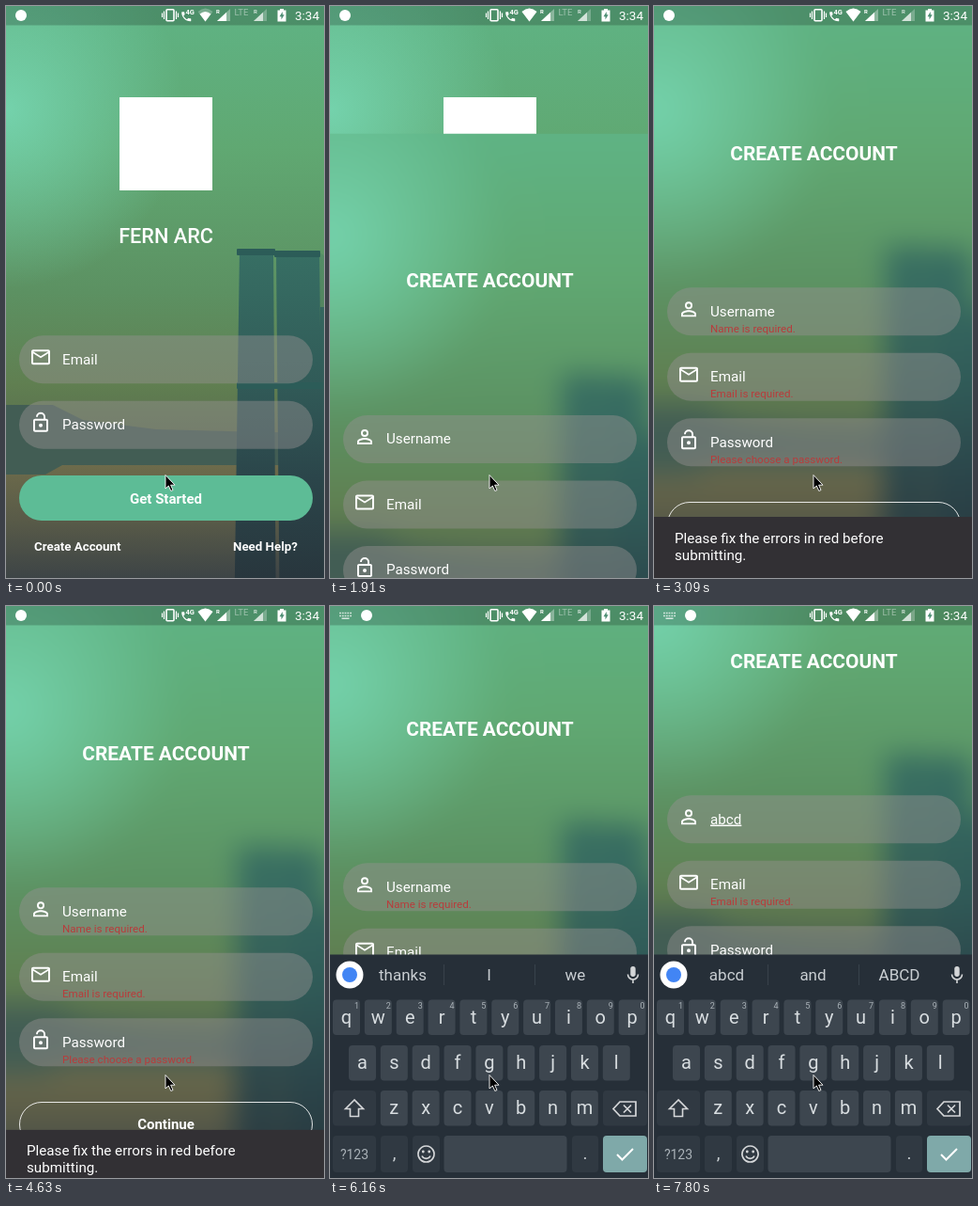
Animation, 339 px wide and 608 px high, one loop 8000 ms. Source, as an HTML page:

```html
<!DOCTYPE html>
<html lang="en">
<head>
<meta charset="utf-8">
<title>Create account</title>
<style>
  html, body { margin: 0; width: 100%; height: 100%; overflow: hidden; background: #5c9163; }
  svg { display: block; }
  text { font-family: Roboto, "Noto Sans", sans-serif; white-space: pre; }
  .mid { text-anchor: middle; }
  .b { font-weight: 700; }
</style>
</head>
<body>
<svg id="stage" width="339" height="608" viewBox="0 0 339 608" fill="#fff"></svg>
<script>
const ICONS = {
  mail: 'M20 4H4c-1.1 0-2 .9-2 2v12c0 1.1.9 2 2 2h16c1.1 0 2-.9 2-2V6c0-1.1-.9-2-2-2zm0 14H4V8l8 5 8-5v10zm-8-7L4 6h16l-8 5z',
  person: 'M12 5.9a2.1 2.1 0 1 1 0 4.2a2.1 2.1 0 0 1 0-4.2m0 9c2.97 0 6.1 1.46 6.1 2.1v1.1H5.9V17c0-.64 3.13-2.1 6.1-2.1M12 4a4 4 0 1 0 0 8a4 4 0 0 0 0-8zm0 9c-2.67 0-8 1.34-8 4v3h16v-3c0-2.66-5.33-4-8-4z',
  lock: 'M12 17a2 2 0 1 0 0-4a2 2 0 0 0 0 4zm6-9h-1V6A5 5 0 0 0 7 6h1.9a3.1 3.1 0 0 1 6.2 0v2H6c-1.1 0-2 .9-2 2v10c0 1.1.9 2 2 2h12c1.1 0 2-.9 2-2V10c0-1.1-.9-2-2-2zm0 12H6V10h12v10z',
  phone: 'M6.6 10.8c1.4 2.8 3.8 5.1 6.6 6.6l2.2-2.2c.3-.3.7-.4 1-.2 1.1.4 2.3.6 3.6.6.6 0 1 .4 1 1V20c0 .6-.4 1-1 1C10.600 21 3 13.400 3 4c0-.6.4-1 1-1h3.500c.6 0 1 .4 1 1 0 1.300.2 2.500.6 3.600.1.3 0 .7-.2 1z'
};

const text = (x, y, size, str, attrs = '') => `<text x="${x}" y="${y}" font-size="${size}" ${attrs}>${str}</text>`;
const rect = (x, y, w, h, r, attrs = '') => `<rect x="${x}" y="${y}" width="${w}" height="${h}" rx="${r}" ${attrs}/>`;
const line = (d, width, attrs = '') => `<path d="${d}" fill="none" stroke="#fff" stroke-width="${width}" ${attrs}/>`;
const icon = (name, x, y, scale = 1) => `<path transform="translate(${x} ${y}) scale(${scale})" d="${ICONS[name]}"/>`;
const gradient = (id, y1, y2, stops) =>
  `<linearGradient id="${id}" gradientUnits="userSpaceOnUse" x1="0" x2="0" y1="${y1}" y2="${y2}">` +
  stops.map(([at, color]) => `<stop offset="${at}" stop-color="${color}"/>`).join('') + '</linearGradient>';

const field = (y, name, label, id = '') =>
  rect(14, y, 313, 51, 25.5, 'fill="#969191" fill-opacity=".45"') + icon(name, 25, y + 11) +
  text(60, y + 30.3, 15.2, label, id && `id="${id}"`);
const error = (y, str, id) => text(60, y + 47.5, 11.6, str, `id="${id}" fill="#b83c3c"`);

function scenery() {
  const slab = (x, y, w) => rect(x, y, w, 7, 1, 'fill="#2c5c58"');
  return `<defs>
    ${gradient('sky', 0, 608, [[0, '#5fb384'], [.25, '#60a872'], [.5, '#5c9162'], [.66, '#607f51'], [.8, '#56634c'], [1, '#3c474a']])}
    ${gradient('water', 488, 608, [[0, '#6d6b4b'], [.5, '#585a48'], [1, '#3d4446']])}
    ${gradient('tower', 258, 608, [[0, '#376f64'], [.4, '#315b58'], [.7, '#2b454a'], [1, '#28363d']])}
    <radialGradient id="glow" gradientUnits="userSpaceOnUse" cx="0" cy="110" r="190">
      <stop offset="0" stop-color="#74d2ac"/><stop offset="1" stop-color="#74d2ac" stop-opacity="0"/>
    </radialGradient>
    <filter id="blur" filterUnits="userSpaceOnUse" x="-60" y="-60" width="459" height="728" color-interpolation-filters="sRGB">
      <feGaussianBlur stdDeviation="15"/>
    </filter>
    <g id="scene">
      ${rect(-60, -60, 459, 728, 0, 'fill="url(#sky)"')}
      ${rect(-60, -60, 459, 400, 0, 'fill="url(#glow)"')}
      ${rect(-60, 488, 459, 180, 0, 'fill="url(#water)"')}
      <path fill="#425d54" d="M-60 424H50L82 440L160 450L400 456V488H60L42 498H-60z"/>
      <g fill="url(#tower)">
        <path d="M249 258H285L288 668H243z"/><path d="M288 262H334L399 300V668H292z" opacity=".25"/>
        <path d="M288 260H334L339 668H292z"/>${rect(335, 320, 64, 348, 0)}
      </g>
      ${slab(246, 258, 41)}${slab(286, 260, 49)}${slab(246, 400, 92)}
    </g>
  </defs>`;
}

function loginPage() {
  return `<use href="#scene"/>` + rect(121, 97, 99, 99, 0) +
    text(170.5, 252, 21.7, 'FERN ARC', 'class="mid" font-weight="500"') +
    field(350.3, 'mail', 'Email') + field(419.8, 'lock', 'Password') +
    rect(14, 499, 313, 48, 24, 'fill="#5dbc96"') +
    text(170.5, 528.5, 15, 'Get Started', 'class="mid b"') +
    text(30, 578.5, 13.3, 'Create Account', 'class="b"') +
    text(242, 578.5, 13.3, 'Need Help?', 'class="b"');
}

function accountPage() {
  return `<g id="page"><svg width="339" height="608"><use href="#scene" filter="url(#blur)"/></svg>` +
    text(170.5, 163.500, 20.9, 'CREATE ACCOUNT', 'class="mid b"') +
    field(299.3, 'person', 'Username', 'user') + field(368.8, 'mail', 'Email') + field(438.3, 'lock', 'Password') +
    error(299.3, 'Name is required.', 'nameError') +
    `<g id="errors">${error(368.8, 'Email is required.')}${error(438.3, 'Please choose a password.')}</g>` +
    rect(68.5, 317, 1.5, 16, 0, 'id="caret" fill="#6fb4d8"') +
    rect(14.5, 527.5, 312, 47, 23.5, 'fill="none" stroke="#fff" stroke-opacity=".85"') +
    text(170.500, 556, 15, 'Continue', 'class="mid b"') +
    text(170.5, 605.5, 13.3, 'Terms &amp; Condition', 'class="mid b"') + '</g>';
}

function snackBar() {
  return `<g id="snack">${rect(0, 0, 339, 65, 0, 'fill="#323034"')}` +
    text(22, 27.5, 15.2, 'Please fix the errors in red before') + text(22, 45.5, 15.2, 'submitting.') + '</g>';
}

function keyboard() {
  const pitch = 33.85;
  const key = (x, y, w, h, fill, id = '') => rect(x, y, w, h, 4, `fill="${fill}" ${id && `id="key-${id}"`}`);
  let out = rect(0, 370.5, 339, 238, 0, 'fill="#262f38"');
  [['qwertyuiop', 17.5, 418.5], ['asdfghjkl', 34.5, 467], ['zxcvbnm', 68.3, 515]].forEach(([letters, start, y], row) =>
    [...letters].forEach((ch, i) => {
      const x = start + i * pitch;
      out += key(x - 14.500, y, 29, 37.5, '#3d464f', ch) + text(x, y + 25, 20, ch, 'class="mid" fill="#d8dde0"');
      if (!row) out += text(x + 11, y + 9.5, 9, (i + 1) % 10, 'class="mid" fill="#a9b1b7"');
    }));
  [[3, 515, 46, 37.5], [291, 515, 47, 37.5], [3, 563, 46, 39], [54, 563, 29, 39], [88, 563, 29, 39], [258, 563, 28, 39]]
    .forEach(box => out += key(...box, '#303942'));
  out += key(121.5, 563, 131, 39, '#3d464f') + key(291, 563, 47, 39, '#7fa9a9');
  out += text(26, 587.5, 14, '?123', 'class="mid" fill="#aab2b8"') +
    text(68.5, 588, 19, ',', 'class="mid" fill="#c8ced2"') + text(272, 588, 19, '.', 'class="mid" fill="#c8ced2"');
  out += `<g opacity=".8">` +
    line('M26 525L16.500 534.5H21.500V542.5H30.500V534.5H35.500z', 1.6) +
    line('M309 527H326V542H309L302 534.500zM313 530.500L321 538.500M321 530.5L313 538.5', 1.7) +
    line('M102.5 574a8.5 8.5 0 1 0 .01 0M98 584.5a5 5 0 0 0 9 0', 1.7) +
    '<circle cx="99.3" cy="580" r="1.4"/><circle cx="105.7" cy="580" r="1.4"/>' +
    rect(320.3, 383, 5.4, 11, 2.7) + line('M317.5 391.500a5.500 5.5 0 0 0 11 0M323 397V401', 1.6) + '</g>' +
    line('M306 583L311.500 588.500L323 577', 2);
  out += '<circle cx="21" cy="392" r="14.5"/><circle cx="21" cy="392" r="8" fill="#4285f4"/>' +
    rect(121, 381, 1, 22, 0, 'fill="#38424b"') + rect(218, 381, 1, 22, 0, 'fill="#38424b"');
  out += [77.5, 169.5, 261.5].map((x, i) => text(x, 398, 17, '', `id="word${i}" class="mid" fill="#c9ced2"`)).join('');
  return `<g id="keys">${out}</g>`;
}

function statusBar() {
  const signal = x => `<path d="M${x} 16L${x + 14} 3V16z" opacity=".35"/><path d="M${x} 16L${x + 10} 6.700V16z"/>`;
  return rect(0, 0, 339, 20.5, 0, 'fill="#000" fill-opacity=".2"') +
    '<circle id="notice" cx="16" cy="10" r="6"/>' +
    `<g id="imeIcon" opacity=".75">${line('M10 7.5H23M10 10.500H23', 1.6, 'stroke-dasharray="1.8 1"')}${rect(12.5, 12.500, 8, 1.5, 0)}</g>` +
    rect(171, 3.8, 8, 12, 1, 'fill="none" stroke="#fff" stroke-width="1.600"') +
    line('M168.500 5.500V14M166.500 7.500V12M181.500 5.500V14M183.500 7.500V12', 1.2) +
    icon('phone', 185.500, 4.5, .56) + text(191.5, 9, 7.5, '4G', 'class="b"') +
    '<path d="M204.500 6Q212.500 -1 220.500 6L212.5 16.500z" opacity=".25"/><path id="wifi"/>' +
    signal(225) + text(224, 8, 6, 'R', 'class="b"') +
    text(243.500, 10, 9.500, 'LTE', 'opacity=".45"') +
    `<g opacity=".75">${signal(264)}${text(264, 8, 6, 'R', 'class="b"')}</g>` +
    '<path d="M292 3H296V4.500H298.500V16.500H289.500V4.500H292z"/><path fill="#4e8f74" d="M294.800 6L291.500 11.200H293.500V14.500L296.700 9.300H294.800z"/>' +
    text(308, 14.8, 13.5, '3:34');
}

const pointer = '<path d="M170 498.500V513L173.300 510L175.800 515.500L178 514.500L175.600 509.200H180z" fill="#000" stroke="#fff" stroke-width=".9"/>';

const stage = document.getElementById('stage');
stage.innerHTML = scenery() + loginPage() + accountPage() + snackBar() + keyboard() + statusBar() + pointer;
const $ = id => document.getElementById(id);
const show = (id, on) => $(id).setAttribute('display', on ? 'inline' : 'none');
const moveY = (id, y) => $(id).setAttribute('transform', `translate(0 ${y.toFixed(2)})`);

// Material standard curve, cubic-bezier(.4, 0, .2, 1)
function ease(x) {
  if (x <= 0) return 0;
  if (x >= 1) return 1;
  let lo = 0, hi = 1, u;
  for (let i = 0; i < 24; i++) {
    u = (lo + hi) / 2;
    const v = 1 - u;
    if (1.2 * u * v * v + .6 * u * u * v + u * u * u < x) lo = u; else hi = u;
  }
  return u * u * (3 - 2 * u);
}

const LOOP = 8000, STEP = 117.9, ORIGIN = 1078;
const TYPED = 'abcd', PRESSES = [49, 52, 54, 56].map(n => n - 0);
const WORDS = ['thanks I we', 'a are and', 'ab about abs', 'abc ABC and', 'abcd and ABCD'];

function draw(time) {
  const step = Math.floor((time - ORIGIN) / STEP);
  const t = ORIGIN + step * STEP;
  const tween = (start, length) => ease((t - start) / length);

  const scroll = 26 * tween(5560, 250) + 72 * tween(6350, 260);
  moveY('page', 608 * (1 - tween(1753, 300)) - scroll);
  moveY('snack', 608 - 65 * (tween(2805, 250) - tween(4555, 250)));
  moveY('keys', 238 * (1 - tween(5290, 300)));

  const typed = PRESSES.filter(p => step >= p).length;
  const suggested = PRESSES.filter(p => step > p).length;
  show('errors', step >= 15);
  show('nameError', step >= 15 && !typed);
  $('user').textContent = TYPED.slice(0, typed) || 'Username';
  $('user').setAttribute('text-decoration', typed ? 'underline' : 'none');
  show('caret', typed && t % 1000 < 500);
  $('caret').setAttribute('x', 60 + 8.4 * typed);

  const words = step >= 42 ? WORDS[suggested].split(' ') : ['', '', ''];
  words.forEach((word, i) => $('word' + i).textContent = word);
  PRESSES.forEach((p, i) => $('key-' + TYPED[i]).setAttribute('fill', step === p ? '#59636c' : '#3d464f'));

  const typing = step >= 36;
  show('imeIcon', typing);
  $('notice').setAttribute('cx', typing ? 39 : 16);
  $('wifi').setAttribute('d', step < 0 ? 'M206.500 8.500Q212.500 3.500 218.500 8.500L212.500 16.500z' : 'M204.500 6Q212.500 -1 220.500 6L212.500 16.500z');
}

const began = performance.now();
function frame() {
  draw((performance.now() - began) % LOOP);
  requestAnimationFrame(frame);
}
frame();
</script>
</body>
</html>
```
